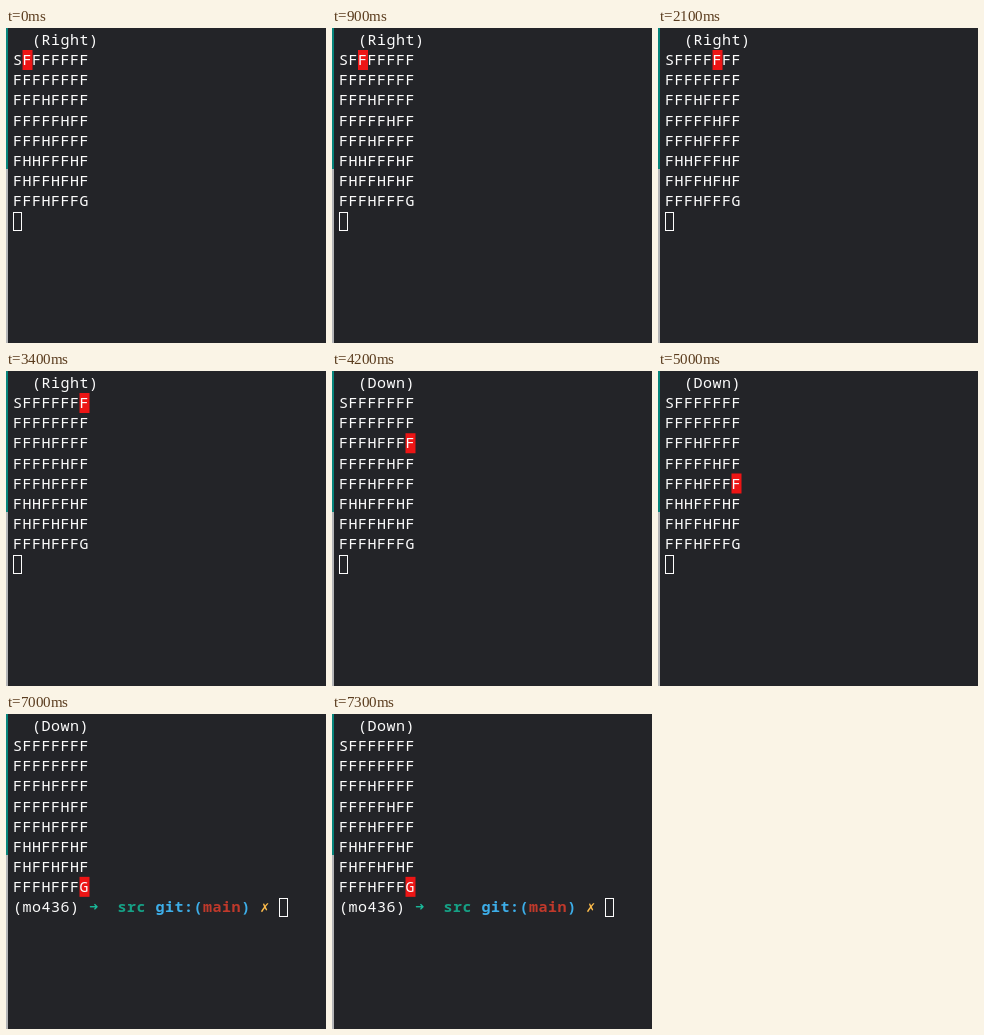
An HTML page that plays this animation: 320 px wide and 315 px high, repeating every 7400 ms.

```html
<!DOCTYPE html>
<html lang="en">
<head>
<meta charset="utf-8">
<title>Frozen lake walk</title>
<style>
  html, body { margin: 0; width: 100%; height: 100%; overflow: hidden; background: #232428; }
  #stage {
    --cell: 9.5px; --row: 20.12px;
    position: relative; width: 320px; height: 315px; overflow: hidden;
    background: linear-gradient(#08857c 141px, #b4b5b7 141px) 0 0 / 2px 100% no-repeat #232428;
  }
  pre {
    position: absolute; left: 7px; top: 1.1px; margin: 0;
    font: 15px/var(--row) "Noto Sans Mono", "DejaVu Sans Mono", monospace;
    letter-spacing: .5px; color: #fcfcfc;
  }
  #lake { top: calc(1.1px + var(--row)); }
  #prompt { top: calc(1.1px + 9 * var(--row)); }
  #marker, #caret { position: absolute; box-sizing: border-box; }
  #marker { left: 7px; top: 22px; width: var(--cell); height: var(--row); background: #ed1515; }
  #caret { left: 7px; top: 184px; width: 9px; height: 19px; border: 1px solid #fcfcfc; }
  .green { color: #1abc9c; }
  .cyan { color: #16a085; }
  .blue { color: #3daee9; }
  .red { color: #c0392b; }
  .yellow { color: #fdbc4b; }
</style>
</head>
<body>
<div id="stage">
  <div id="marker"></div>
  <pre id="title"></pre>
  <pre id="lake">SFFFFFFF
FFFFFFFF
FFFHFFFF
FFFFFHFF
FFFHFFFF
FHHFFFHF
FHFFHFHF
FFFHFFFG</pre>
  <pre id="prompt">(mo436) <b class="green">➜</b>  <b class="cyan">src</b> <b class="blue">git:(</b><b class="red">main</b><b class="blue">)</b> <b class="yellow">✗</b></pre>
  <div id="caret"></div>
</div>
<script>
  const LOOP = 7400, STEP = 500, LAST = 7;
  const CELL = 9.5, ROW = 20.12, PROMPT_AT = 7000, PROMPT_COLS = 28;
  const [marker, title, prompt, caret] =
    ["marker", "title", "prompt", "caret"].map(id => document.getElementById(id));
  const start = performance.now();

  function draw(time) {
    // One move per step: right along the top row, then down the last column.
    const moves = 1 + Math.floor(time / STEP);
    const col = Math.min(moves, LAST);
    const row = Math.min(Math.max(moves - LAST, 0), LAST);
    const done = time >= PROMPT_AT;

    marker.style.transform = `translate(${col * CELL}px, ${row * ROW}px)`;
    title.textContent = row ? "  (Down)" : "  (Right)";
    prompt.style.visibility = done ? "visible" : "hidden";
    caret.style.transform = `translateX(${done ? PROMPT_COLS * CELL : 0}px)`;
  }

  function tick() {
    draw((performance.now() - start) % LOOP);
    requestAnimationFrame(tick);
  }
  tick();
</script>
</body>
</html>
```
